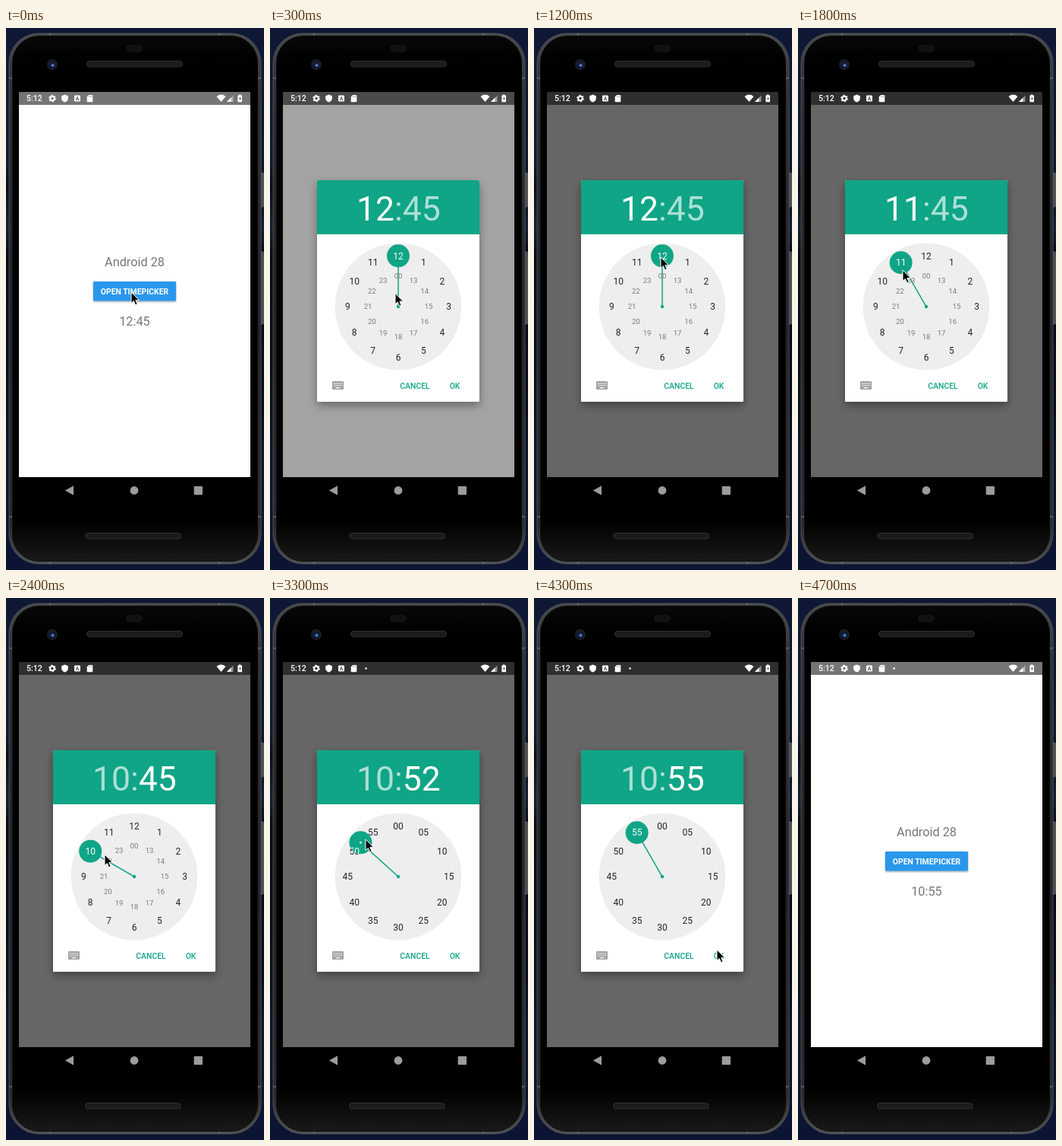
An HTML page for the animation above (4.8 s loop, 340 by 712 pixels).

```html
<!DOCTYPE html>
<html lang="en">
<head>
<meta charset="utf-8">
<title>Time picker</title>
<style>
  html, body { margin: 0; width: 100%; height: 100%; overflow: hidden; background: #0b1430; }
  svg { display: block; width: 340px; height: 712px; font-family: Roboto, sans-serif; }
  .mid { text-anchor: middle; }
  .label { font-size: 16.3px; fill: #777; }
  .action { font-size: 10.4px; font-weight: 500; fill: #0fa586; }
</style>
</head>
<body>
<svg viewBox="0 0 340 712">
  <defs>
    <linearGradient id="sky" x2="0" y2="1">
      <stop offset="0" stop-color="#0e1834"/><stop offset=".25" stop-color="#0f1a38"/>
      <stop offset=".29" stop-color="#080d1c"/><stop offset=".37" stop-color="#17213a"/>
      <stop offset=".42" stop-color="#060a16"/><stop offset=".74" stop-color="#0a1128"/>
      <stop offset=".77" stop-color="#0c1634"/><stop offset="1" stop-color="#0b1432"/>
    </linearGradient>
    <linearGradient id="rim" x2="0" y2="1">
      <stop offset="0" stop-color="#4a4b4e"/><stop offset=".1" stop-color="#303133"/>
      <stop offset=".5" stop-color="#242426"/><stop offset=".93" stop-color="#2c2c2e"/>
      <stop offset="1" stop-color="#505154"/>
    </linearGradient>
    <linearGradient id="glass" x2="0" y2="1">
      <stop offset="0" stop-color="#080808"/><stop offset=".05" stop-color="#000"/>
      <stop offset=".92" stop-color="#000"/><stop offset="1" stop-color="#191919"/>
    </linearGradient>
    <filter id="lift" x="-20%" y="-20%" width="140%" height="150%">
      <feDropShadow dx="0" dy="5" stdDeviation="6" flood-opacity=".36"/>
    </filter>
    <filter id="lowLift" x="-10%" y="-20%" width="120%" height="170%">
      <feDropShadow dx="0" dy="1.2" stdDeviation="1.2" flood-opacity=".4"/>
    </filter>
  </defs>

  <rect width="340" height="712" fill="url(#sky)"/>
  <g fill="#4b4d52" stroke="#77797d" stroke-width=".6">
    <rect x="334" y="190" width="5.5" height="45" rx="1.5"/>
    <rect x="334" y="294" width="5.5" height="95" rx="1.5"/>
  </g>
  <rect x="4" y="7" width="332" height="697" rx="39" fill="url(#rim)" stroke="#55575a" stroke-width=".8"/>
  <path d="M4 66h7M329 66h7M4 642h7M329 642h7M58 7v4M281 7v4M58 700v4M281 700v4" stroke="#6a6b6d" stroke-width="1.6"/>
  <rect x="8.5" y="10.5" width="323" height="690" rx="35" fill="url(#glass)" stroke="#0c0c0c"/>
  <rect x="158" y="22" width="22" height="10" rx="5" fill="#111"/>
  <g fill="#1b1b1c" stroke="#2f2f31">
    <rect x="106.5" y="43.5" width="126" height="7.5" rx="3.75"/>
    <rect x="104.5" y="663.5" width="126" height="7.5" rx="3.75"/>
  </g>
  <circle cx="61" cy="48" r="7.2" fill="#1a1b20"/>
  <circle cx="61" cy="48" r="4.6" fill="#101a38"/>
  <circle cx="61.5" cy="49" r="2.3" fill="#3153a0"/>
  <circle cx="61.8" cy="49.2" r=".9" fill="#8fb0ec"/>

  <rect x="17" y="84" width="305" height="506" fill="#fff"/>
  <rect x="17" y="84" width="305" height="17" fill="#757575"/>
  <text class="mid label" x="169.5" y="313.2">Android 28</text>
  <rect x="115" y="333" width="109" height="25.5" rx="1.2" fill="#2b97ec" filter="url(#lowLift)"/>
  <text class="mid" x="169.5" y="349.7" font-size="10.4" font-weight="700" fill="#fff">OPEN TIMEPICKER</text>
  <text class="mid label" id="result" x="169.5" y="391.3"></text>
  <rect id="dim" x="17" y="84" width="305" height="506"/>

  <g fill="#fff">
    <text x="27" y="96.3" font-size="10.6" font-weight="500">5:12</text>
    <circle cx="61" cy="92.5" r="2.7" fill="none" stroke="#fff" stroke-width="2"/>
    <circle cx="61" cy="92.5" r="4.1" fill="none" stroke="#fff" stroke-width="1.5" stroke-dasharray="2.2 2.09"/>
    <path d="M77.500 87.500l4.300 1.700v3.200q0 3.500-4.300 5q-4.300-1.500-4.300-5v-3.200z"/>
    <rect x="90" y="88.500" width="8" height="8" rx="1"/>
    <path d="M92.200 95l1.800-4.800 1.800 4.800M92.900 93.500h2.200" fill="none" stroke="#555" stroke-width=".9"/>
    <path d="M109 88h4.500q.8 0 .8.800v7.600q0 .8-.8.800h-6q-.8 0-.8-.8v-6z"/>
    <path d="M109.300 89.300v1.600M111 89.300v1.600M112.600 89.300v1.600" stroke="#777" stroke-width=".7"/>
    <circle id="notice" cx="126.500" cy="92.500" r="1.300"/>
    <path d="M283.500 97l-6-7q6-4.800 12 0z"/>
    <path d="M291 97l8.500-8.500v8.500z" opacity=".45"/>
    <path d="M291 97l5.500-5.500v5.500z"/>
    <path d="M306.800 87.500h2.600v1h1.600v8.800h-5.600v-8.800h1.400z"/>
    <path d="M308.700 90l-1.800 3.200h1.200v2.300l1.800-3.400h-1.200z" fill="#555"/>
  </g>

  <g fill="#9b9b9b">
    <path d="M78 607.500l11-6.200v12.400z"/>
    <circle cx="169" cy="607.500" r="5.400"/>
    <rect x="247.700" y="602" width="11.300" height="11.300" rx="1"/>
  </g>

  <g id="dialog">
    <rect x="62" y="200" width="214" height="291" rx="1.500" fill="#fff" filter="url(#lift)"/>
    <path d="M62 271v-69.500q0-1.500 1.500-1.500h211q1.500 0 1.500 1.500v69.500z" fill="#0fa586"/>
    <text class="mid" x="169.300" y="253.300" font-size="44.500" fill="#fff"><tspan id="hour"></tspan><tspan fill-opacity=".65">:</tspan><tspan id="minute"></tspan></text>
    <circle cx="169" cy="366" r="83.300" fill="#eee"/>
    <g id="dials"></g>
    <rect x="82" y="464" width="15" height="11" rx="1.300" fill="#a2a2a2"/>
    <path d="M84 467h11M84 469.700h11" stroke="#fff" stroke-width="1.300" stroke-dasharray="1.300 1.120"/>
    <path d="M86.500 472.700h6" stroke="#fff" stroke-width="1.300"/>
    <text class="mid action" x="191" y="473.800">CANCEL</text>
    <text class="mid action" x="243.500" y="473.800">OK</text>
  </g>

  <path id="cursor" d="M0 0v14.500l3.300-3 2.300 5.300 2.500-1.100-2.300-5.100h4.700z" fill="#000" stroke="#fff" stroke-width="1"/>
</svg>
<script>
const LOOP = 4800, STEP = 100;
const CX = 169, CY = 366, OUTER = 66.700, INNER = 40, TEAL = '#0fa586';
const $ = id => document.getElementById(id);
const pad = n => String(n).padStart(2, '0');
const ramp = (t, a, b) => Math.min(1, Math.max(0, (t - a) / (b - a)));

// Point on the clock face; turn is a fraction of a full circle from the top.
function polar(turn, radius) {
  const a = turn * 2 * Math.PI;
  return [CX + radius * Math.sin(a), CY - radius * Math.cos(a)];
}

function ring(labels, radius, size, color) {
  return labels.map((label, i) => {
    const [x, y] = polar(i / 12, radius);
    return `<text class="mid" x="${x}" y="${y + size * 0.355}" font-size="${size}" fill="${color}">${label}</text>`;
  }).join('');
}

function makeDial(name, outer, inner) {
  $('dials').insertAdjacentHTML('beforeend', `
    <g id="${name}">
      <clipPath id="${name}Clip"><circle class="knob" r="15"/></clipPath>
      <line x1="${CX}" y1="${CY}" stroke="${TEAL}" stroke-width="1.500"/>
      <circle cx="${CX}" cy="${CY}" r="2.200" fill="${TEAL}"/>
      ${ring(outer, OUTER, 12, '#252525')}${ring(inner, INNER, 9.500, '#7b7b7b')}
      <circle class="knob" r="15" fill="${TEAL}"/>
      <g clip-path="url(#${name}Clip)">${ring(outer, OUTER, 12, '#fff')}</g>
      <circle class="knob dot" r="1.300" fill="#fff"/>
    </g>`);
  const root = $(name), line = root.querySelector('line');
  const knobs = root.querySelectorAll('.knob'), dot = root.querySelector('.dot');
  return (turn, opacity) => {
    const [x, y] = polar(turn, OUTER);
    root.setAttribute('opacity', opacity);
    line.setAttribute('x2', x);
    line.setAttribute('y2', y);
    knobs.forEach(k => { k.setAttribute('cx', x); k.setAttribute('cy', y); });
    const onLabel = Math.abs(turn * 12 - Math.round(turn * 12)) < 0.01;
    dot.setAttribute('opacity', onLabel ? 0 : 1);
  };
}

const twelve = f => Array.from({ length: 12 }, (_, i) => f(i));
const setHourDial = makeDial('hours', twelve(i => i || 12), twelve(i => i ? i + 12 : '00'));
const setMinuteDial = makeDial('minutes', twelve(i => pad(i * 5)), []);

const cursorPath = [
  [0, 165, 347], [300, 165, 348.500], [600, 165, 348.500], [1100, 167, 301], [1300, 167, 301],
  [1500, 150, 306], [1800, 138, 318], [2000, 131, 334], [2400, 130, 337], [2600, 130, 337],
  [2900, 116, 327], [3100, 120, 323], [3300, 126, 317], [3500, 139, 308], [3600, 139, 308],
  [4000, 241, 462], [4400, 241, 462], [4600, 345, 440], [4800, 345, 440]
];
const hourSteps = [[0, 12], [1500, 11], [2000, 10]];
const minuteSteps = [[0, 45], [3000, 50], [3200, 51], [3300, 52], [3400, 53], [3500, 55]];
const valueAt = (steps, t) => steps.filter(s => s[0] <= t).pop()[1];

function cursorAt(t) {
  const i = cursorPath.findIndex(k => k[0] > t);
  const [t0, x0, y0] = cursorPath[i - 1], [t1, x1, y1] = cursorPath[i];
  const p = ramp(t, t0, t1), e = p * p * (3 - 2 * p);
  return [x0 + (x1 - x0) * e, y0 + (y1 - y0) * e];
}

function draw(t) {
  const hour = valueAt(hourSteps, t), minute = valueAt(minuteSteps, t);
  const shown = ramp(t, 150, 290) - ramp(t, 4320, 4500);
  const swap = ramp(t, 2400, 2700);
  const scale = 0.9 + 0.1 * ramp(t, 150, 290);

  $('dim').setAttribute('opacity', 0.6 * (ramp(t, 150, 400) - ramp(t, 4320, 4600)));
  $('dialog').setAttribute('opacity', shown);
  $('dialog').setAttribute('transform', `translate(169 345.500) scale(${scale}) translate(-169 -345.500)`);
  $('result').textContent = t < 4400 ? '12:45' : '10:55';
  $('hour').textContent = hour;
  $('minute').textContent = pad(minute);
  $('hour').setAttribute('fill-opacity', t < 2400 ? 1 : 0.65);
  $('minute').setAttribute('fill-opacity', t < 2400 ? 0.65 : 1);
  $('notice').setAttribute('opacity', t < 2800 ? 0 : 1);
  setHourDial(hour / 12, 1 - swap);
  setMinuteDial(minute / 60, swap);
  $('cursor').setAttribute('transform', `translate(${cursorAt(t)})`);
}

const start = performance.now();
function tick() {
  const t = (performance.now() - start) % LOOP;
  draw(Math.floor(t / STEP) * STEP);
  requestAnimationFrame(tick);
}
tick();
</script>
</body>
</html>
```
